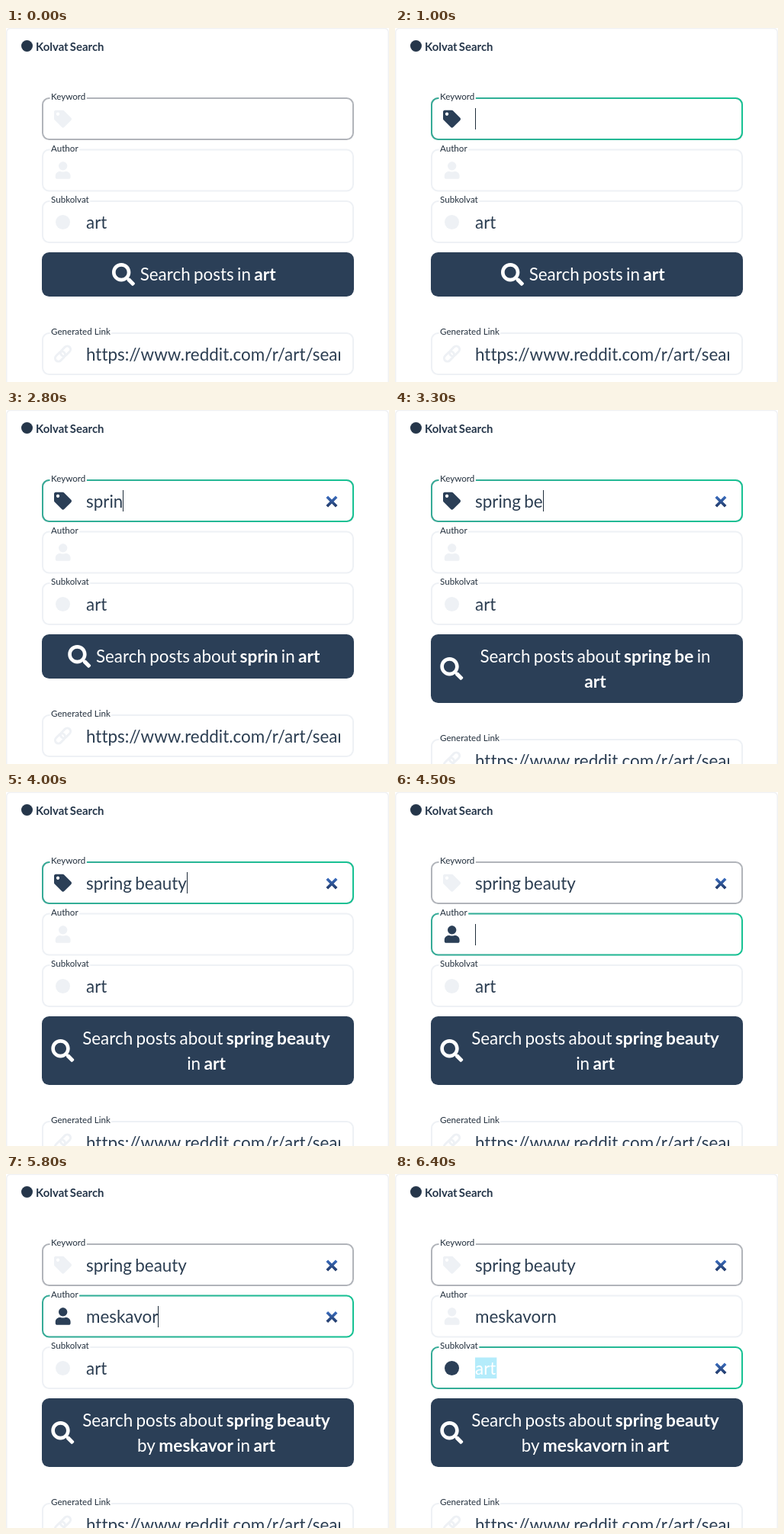
An HTML page with a canvas that plays this animation: 502x464 px, repeating every 7.2 s.

```html
<!DOCTYPE html>
<html lang="en">
<head>
<meta charset="utf-8">
<title>Kolvat Search</title>
<style>
html, body { margin: 0; width: 502px; height: 464px; overflow: hidden; background: #fff; }
canvas { display: block; width: 502px; height: 464px; }
</style>
</head>
<body>
<canvas id="stage"></canvas>
<script>
const W = 502, H = 464, LOOP = 7200;
const canvas = document.getElementById('stage');
const c = canvas.getContext('2d');
const dpr = window.devicePixelRatio || 1;
canvas.width = W * dpr;
canvas.height = H * dpr;
c.letterSpacing = '0.01px'; // keeps "tt" from joining

const NAVY = '#2b3f57', PALE = '#eef1f5', GREY = '#b1b4ba', INK = '#2c3e52';
const BODY = '22.4px Lato, sans-serif';
const BOLD = 'bold 22.7px Lato, sans-serif';
const LABEL = '11.6px Lato, sans-serif';
const TITLE = 'bold 14.9px Lato, sans-serif';
const LEFT = 47, WIDTH = 409, MID = LEFT + WIDTH / 2, TEXT_X = 105;
const MAX_LINE = 333, LINE = 33, GROW = 32;

const tag = new Path2D('M0 252V48C0 21.5 21.5 0 48 0h204a48 48 0 0 1 34 14l212 212c18.7 18.7 18.7 49 0 68L294 498c-18.7 18.7-49 18.7-68 0L14 286A48 48 0 0 1 0 252zM112 64c-26.5 0-48 21.5-48 48s21.5 48 48 48 48-21.5 48-48-21.5-48-48-48z');
const person = new Path2D('M224 256c70.7 0 128-57.3 128-128S294.7 0 224 0 96 57.3 96 128s57.3 128 128 128zm90 32h-17c-22 10-47 16-73 16s-51-6-73-16h-17C60 288 0 348 0 422V464c0 26.5 21.5 48 48 48h352c26.5 0 48-21.5 48-48v-42c0-74-60-134-134-134z');
const lens = new Path2D('M505 443L405 343c-4.5-4.5-10.6-7-17-7H372c27.6-35.3 44-79.7 44-128C416 93 323 0 208 0S0 93 0 208s93 208 208 208c48.3 0 92.7-16.4 128-44v16c0 6.4 2.5 12.5 7 17l100 100c9.4 9.4 24.6 9.4 34 0l28-28c9.4-9.4 9.4-24.6 0-34zM208 336c-70.7 0-128-57.2-128-128 0-70.7 57.2-128 128-128 70.7 0 128 57.2 128 128 0 70.7-57.2 128-128 128z');

// Times are in tenths of a second.
const keyword = { label: 'Keyword', top: 91, value: 'spring beauty', icon: drawTag, hover: true,
  keys: [19, 21, 23, 25, 27, 29, 30, 32, 33, 35, 36, 38, 39], focus: 7, blur: 42 };
const author = { label: 'Author', top: 158.5, value: 'meskavorn', icon: drawPerson,
  keys: [47, 49, 50, 52, 53, 55, 56, 58, 59], focus: 42, blur: 62 };
const board = { label: 'Subkolvat', top: 226, value: 'art', icon: drawDot, focus: 62, blur: 99, select: true };
const link = { label: 'Generated Link', top: 399, value: 'https://www.reddit.com/r/art/search?q=', icon: drawChain, plain: true };

const clamp = v => Math.min(1, Math.max(0, v));
const ease = v => { v = clamp(v); return v * v * (3 - 2 * v); };

function setFont(font) {
  c.font = font;
  c.wordSpacing = font === LABEL ? '0px' : '-1.4px';
}

function textWidth(s, font) {
  setFont(font);
  return c.measureText(s).width;
}

function write(s, x, y, font, color) {
  setFont(font);
  c.fillStyle = color;
  c.fillText(s, x, y);
}

function box(x, y, w, h, r) {
  c.beginPath();
  c.roundRect(x, y, w, h, r);
}

function outline(top, color) {
  c.lineWidth = 2;
  c.strokeStyle = color;
  box(LEFT + 1, top + 1, WIDTH - 2, 54, 8.5);
  c.stroke();
}

function dot(x, y, r, color) {
  c.fillStyle = color;
  c.beginPath();
  c.arc(x, y, r, 0, Math.PI * 2);
  c.fill();
}

function glyph(path, x, y, size, color) {
  c.save();
  c.translate(x, y);
  c.scale(size / 512, size / 512);
  c.fillStyle = color;
  c.fill(path);
  c.restore();
}

function drawTag(y, color) { glyph(tag, 63, y - 11.3, 23, color); }
function drawPerson(y, color) { glyph(person, 64.8, y - 11.3, 22.6, color); }
function drawDot(y, color) { dot(74.5, y + 0.5, 9.5, color); }

function drawChain(y, color) {
  c.save();
  c.translate(74.5, y);
  c.rotate(-Math.PI / 4);
  c.strokeStyle = color;
  c.lineWidth = 3;
  for (const x of [-12.5, -2.5]) {
    box(x, -4.3, 15, 8.6, 4.3);
    c.stroke();
  }
  c.restore();
}

function drawCross(y, alpha) {
  const g = c.createLinearGradient(0, y - 7, 0, y + 7);
  g.addColorStop(0, '#3a6dc0');
  g.addColorStop(1, '#223a68');
  c.save();
  c.globalAlpha = alpha;
  c.strokeStyle = g;
  c.lineWidth = 3.7;
  c.beginPath();
  c.moveTo(420.8, y - 6.2);
  c.lineTo(433.2, y + 6.2);
  c.moveTo(433.2, y - 6.2);
  c.lineTo(420.8, y + 6.2);
  c.stroke();
  c.restore();
}

const typed = (f, t) => f.keys ? f.value.slice(0, f.keys.filter(k => k <= t).length) : f.value;

// 0 at rest, 1 when focused
const glow = (f, t) => f.plain ? 0 : ease((t - f.focus + 1.2) / 3) * (1 - ease((t - f.blur + 1.2) / 3));

function caretOn(f, t) {
  if (!f.keys || t < f.focus || t >= f.blur) return false;
  const last = f.keys.filter(k => k <= t).pop() || f.focus;
  return Math.floor((t - last) / 5) % 2 === 0;
}

function drawField(f, t, shift = 0) {
  const top = f.top + shift, mid = top + 28, lit = glow(f, t);
  const value = typed(f, t);

  outline(top, f.hover ? GREY : PALE);
  f.icon(mid, PALE);
  if (lit) {
    const g = c.createLinearGradient(LEFT, 0, LEFT + WIDTH, 0);
    g.addColorStop(0, '#36ab97');
    g.addColorStop(1, '#16c293');
    c.globalAlpha = lit;
    outline(top, g);
    f.icon(mid, NAVY);
    c.globalAlpha = 1;
  }

  c.fillStyle = '#fff';
  c.fillRect(57.5, top - 5, textWidth(f.label, LABEL) + 3, 11);
  write(f.label, 59, top + 3, LABEL, '#222f3d');

  const w = textWidth(value, BODY);
  const selected = f.select && t >= f.focus;
  c.save();
  c.beginPath();
  c.rect(TEXT_X, top, 333, 56);
  c.clip();
  if (selected) {
    c.fillStyle = '#b4ecfb';
    c.fillRect(TEXT_X, mid - 13.5, w + 1, 27.5);
  }
  write(value, TEXT_X, mid + 8.5, BODY, selected ? '#fff' : INK);
  c.restore();

  if (caretOn(f, t)) {
    c.fillStyle = '#1f2d3b';
    c.fillRect(Math.round(TEXT_X + w), Math.round(mid - 14), 1, 28);
  }
  if (value) {
    const shown = f.keys ? ease((t - f.keys[0] + 1) / 3) : 1;
    drawCross(mid + 1, shown * (f.hover ? 1 : lit));
  }
}

function buttonWords(t) {
  const words = [];
  const add = (s, font) => s.trim().split(' ').forEach(w => words.push({ s: w, font, w: textWidth(w, font) }));
  const topic = typed(keyword, t), name = typed(author, t);
  add('Search posts', BODY);
  if (topic) { add('about', BODY); add(topic, BOLD); }
  if (name) { add('by', BODY); add(name, BOLD); }
  add('in', BODY);
  add(board.value, BOLD);
  return words;
}

function wrap(words, gap) {
  const lines = [];
  let line = null;
  for (const word of words) {
    if (!line || line.w + gap + word.w > MAX_LINE) lines.push(line = { words: [], w: -gap });
    line.words.push(word);
    line.w += gap + word.w;
  }
  return lines;
}

// Returns how far the content below is pushed down.
function drawButton(t) {
  const gap = textWidth('n n', BODY) - textWidth('nn', BODY);
  const lines = wrap(buttonWords(t), gap);
  const grow = (lines.length - 1) * GROW;
  c.fillStyle = NAVY;
  box(LEFT, 294, WIDTH, 58 + grow, 9.5);
  c.fill();

  const wide = grow ? MAX_LINE : lines[0].w;
  const iconX = grow ? 59.3 : MID - (wide + 47) / 2;
  const cx = iconX + 36.7 + wide / 2;
  glyph(lens, iconX, 308 + grow / 2, 30, '#fff');
  lines.forEach((line, i) => {
    let x = cx - line.w / 2;
    for (const word of line.words) {
      write(word.s, x, 331 + i * LINE, word.font, '#fff');
      x += word.w + gap;
    }
  });
  return grow;
}

function draw(ms) {
  const t = (ms + 10) / 100;
  c.setTransform(dpr, 0, 0, dpr, 0, 0);
  c.fillStyle = '#fff';
  c.fillRect(0, 0, W, H);
  c.strokeStyle = '#f0f1f3';
  c.lineWidth = 1.5;
  box(0.8, 0.5, W - 1.6, H + 20, 5);
  c.stroke();

  dot(27.5, 23.5, 7.5, '#25364a');
  write('Kolvat Search', 39, 29.5, TITLE, '#25364a');
  drawField(keyword, t);
  drawField(author, t);
  drawField(board, t);
  drawField(link, t, drawButton(t));
}

function tick() {
  draw(performance.now() % LOOP);
  requestAnimationFrame(tick);
}
tick();
</script>
</body>
</html>
```
